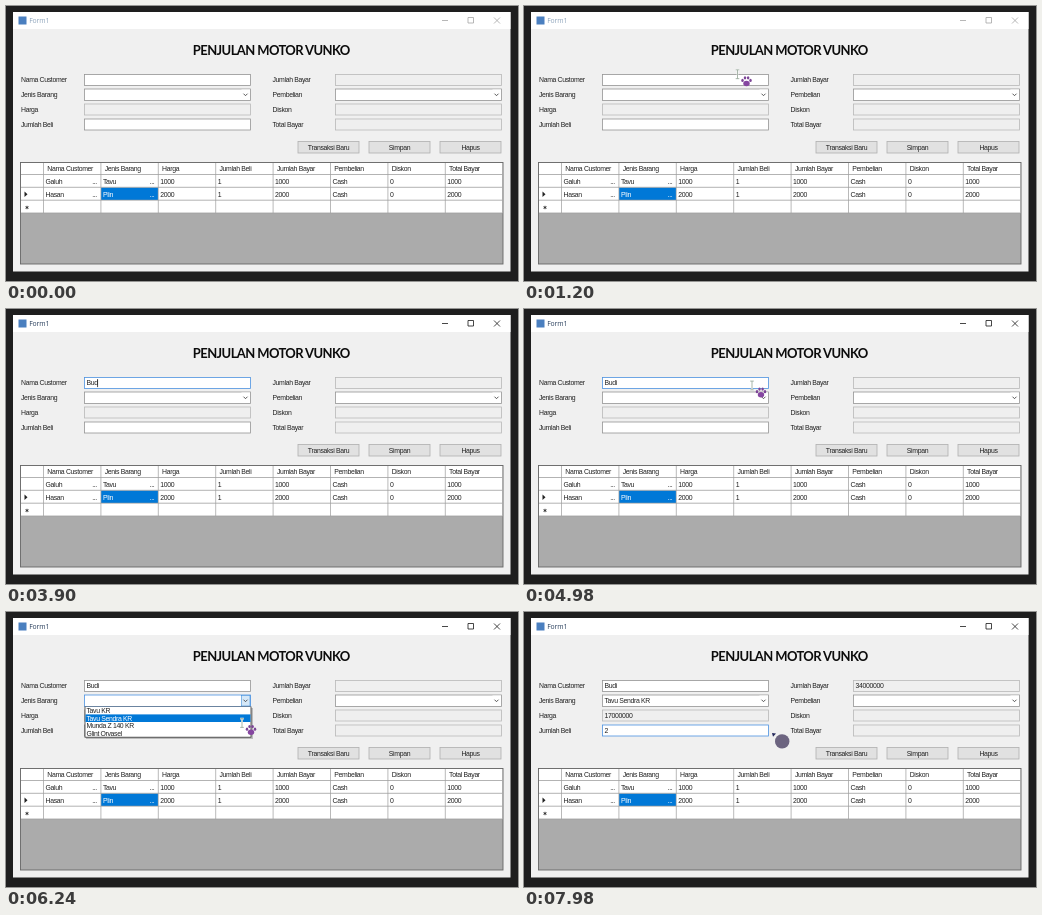
These frames come from a looping animation (512x275 px, 8000 ms). An HTML page:

```html
<!DOCTYPE html>
<html lang="id">
<head>
<meta charset="utf-8">
<title>Form1</title>
<style>
  html, body { margin: 0; width: 100%; height: 100%; overflow: hidden; background: #1e1e1e; }
  svg { display: block; width: 100vw; height: 100vh; }
  text { font: 6.9px "Liberation Sans", Arial, sans-serif; letter-spacing: -.34px; fill: #222; white-space: pre; }
  .caption { font: 6.8px "Open Sans", sans-serif; letter-spacing: -.1px; }
  .heading { font: 700 13px Lato, sans-serif; letter-spacing: -.6px; fill: #0c0c0c; text-anchor: middle; }
  .mid { text-anchor: middle; }
</style>
</head>
<body>
<svg id="stage" viewBox="0 0 512 275"></svg>
<script>
const LOOP = 8000, STEP = 60;
const BLUE = '#0078d7', FOCUS = '#3c8edc', INK = '#222';
const stage = document.getElementById('stage');

function add(tag, attrs, parent = stage) {
  const el = document.createElementNS('http://www.w3.org/2000/svg', tag);
  return parent.appendChild(set(el, attrs));
}
function set(el, attrs) {
  for (const k in attrs) el.setAttribute(k, attrs[k]);
  return el;
}
const group = (parent = stage) => add('g', {}, parent);
const rect = (x, y, width, height, fill, more = {}, parent) =>
  add('rect', { x, y, width, height, fill, ...more }, parent);
const path = (d, stroke, more = {}, parent) =>
  add('path', { d, stroke, fill: 'none', 'stroke-width': .8, ...more }, parent);
function text(x, y, str, more = {}, parent) {
  const el = add('text', { x, y, ...more }, parent);
  el.textContent = str;
  return el;
}
const show = (el, on) => el.setAttribute('visibility', on ? 'visible' : 'hidden');
const clamp = v => Math.max(0, Math.min(1, v));
const mix = (a, b, k) => `rgb(${a.map((v, i) => Math.round(v + (b[i] - v) * k))})`;

// Window frame
rect(0, 0, 512, 275, '#1e1e1e');
rect(7, 6, 497.5, 259.5, '#f0f0f0');
rect(7, 6, 497.5, 17, '#fff');
rect(12.5, 10.5, 8, 8, '#4a7fbf');
const caption = text(23.2, 17.2, 'Form1', { class: 'caption' });
const controls = path('M436 14.5h6M462 11.5h5.5v5.5h-5.5zM488 11.5l6 6m0-6l-6 6', '#000');
text(265.3, 49.2, 'PENJULAN MOTOR VUNKO', { class: 'heading' });

// Form fields
const rowY = [68.5, 83, 98, 113];
function field(x, row, label, labelX, kind) {
  const y = rowY[row], h = kind === 'combo' ? 11.5 : 11;
  text(labelX, y + 7.9, label);
  const box = rect(x, y, 166, h, kind === 'off' ? '#efefef' : '#fff',
    { stroke: kind === 'off' ? '#b8b8b8' : '#949494', 'stroke-width': .8 });
  const button = kind === 'combo' && rect(x + 157, y + .5, 8.5, h - 1, '#fff', { 'stroke-width': .6 });
  if (button) path(`M${x + 159} ${y + 4.7}l2 2l2-2`, '#444', { 'stroke-width': .9 });
  const mark = rect(x + 1.5, y + 1.5, 47.5, 8.5, BLUE, { visibility: 'hidden' });
  return { box, button, mark, value: text(x + 2, y + 7.8, '') };
}
const name = field(78.5, 0, 'Nama Customer', 15, 'edit');
const item = field(78.5, 1, 'Jenis Barang', 15, 'combo');
const price = field(78.5, 2, 'Harga', 15, 'off');
const count = field(78.5, 3, 'Jumlah Beli', 15, 'edit');
const total = field(329.5, 0, 'Jumlah Bayar', 266.5, 'off');
field(329.5, 1, 'Pembelian', 266.5, 'combo');
field(329.5, 2, 'Diskon', 266.5, 'off');
field(329.5, 3, 'Total Bayar', 266.5, 'off');
const caret = rect(80, 70, .8, 8, '#222');

['Transaksi Baru', 'Simpan', 'Hapus'].forEach((label, i) => {
  const x = 292 + i * 71;
  rect(x, 135.5, 61, 11.5, '#e1e1e1', { stroke: '#b0b0b0', 'stroke-width': .8 });
  text(x + 30.5, 143.8, label, { class: 'mid' });
});

// Data grid
const colX = i => 37.5 + i * 57.4;
rect(14.5, 156.5, 482.5, 101.5, '#ababab', { stroke: '#666', 'stroke-width': .9 });
rect(15, 157, 481.5, 50, '#fff');
rect(95, 181.5, 57, 12.5, BLUE);
const heads = ['Nama Customer', 'Jenis Barang', 'Harga', 'Jumlah Beli', 'Jumlah Bayar', 'Pembelian', 'Diskon', 'Total Bayar'];
const rows = [
  ['Galuh', 'Tavu', '1000', '1', '1000', 'Cash', '0', '1000'],
  ['Hasan', 'Plin', '2000', '1', '2000', 'Cash', '0', '2000']
];
heads.forEach((h, i) => {
  text(colX(i) + 3.8, 165.2, h);
  path(`M${colX(i)} 157V207`, '#a8a8a8');
});
rows.forEach((row, r) => row.forEach((v, i) => {
  const more = r === 1 && i === 1 ? { style: 'fill:#fff' } : {};
  const y = 178.2 + r * 12.8;
  text(colX(i) + 2, y, v, more);
  if (i < 2) text(colX(i) + 48.7, y, '...', more);
}));
path('M15 168.5H496.5M15 181.3H496.5M15 194.2H496.5M15 207H496.5M496.6 157V207', '#a0a0a0');
path('M18.5 185.5l3 2.7l-3 2.7z', 'none', { fill: INK });
path('M21 199.8v3.4M19.5 200.6l3 1.8m0-1.8l-3 1.8', INK);

// Drop-down list, sliding out from under the combo box
const clip = add('clipPath', { id: 'below' }, add('defs', {}));
rect(70, 94.5, 190, 40, '#000', {}, clip);
const listClip = add('g', { 'clip-path': 'url(#below)' });
const list = group(listClip);
rect(80, 96, 167, 31, '#000', { opacity: .22 }, list);
rect(79, 94.5, 166, 30.7, '#fff', { stroke: '#333', 'stroke-width': .8 }, list);
const hover = rect(79.5, 0, 165, 7.6, BLUE, {}, list);
const choices = ['Tavu KR', 'Tavu Sendra KR', 'Munda Z 140 KR', 'Glint Orvasel']
  .map((s, i) => text(80.5, 101.4 + i * 7.5, s, {}, list));

// Pointers
const arrow = group();
path('M0 0L4 .6L1 3.8z', 'none', { fill: '#22265a' }, arrow);
add('circle', { cx: 10.2, cy: 8.4, r: 7.2, fill: '#6c6480' }, arrow);
const beam = group();
path('M-1.8-4.4h3.6M0-4.4v8.8M-1.8 4.4h3.6', '#fff', { 'stroke-width': 1.6 }, beam);
path('M-1.8-4.4h3.6M0-4.4v8.8M-1.8 4.4h3.6', '#93a596', {}, beam);
add('ellipse', { cx: 9, cy: 9.2, rx: 3.2, ry: 2.7, fill: '#8546a0' }, beam);
[[5, 6.2], [7.5, 3.6], [10.6, 3.6], [13, 6.2]].forEach(([cx, cy]) =>
  add('ellipse', { cx, cy, rx: 1.25, ry: 1.6, fill: '#7c4596' }, beam));

// Pointer route: time, x, y
const route = [
  [180, 500, 27], [360, 400, 34], [540, 283, 56], [720, 221, 69], [780, 217, 67], [960, 232, 52],
  [1020, 230, 54], [1260, 208, 73], [1560, 208, 73], [1680, 208, 76],
  [4680, 208, 75], [4920, 222, 74], [5160, 246, 84], [5400, 240, 88],
  [5580, 240, 88], [5820, 239, 97], [6240, 236, 111],
  [6300, 236, 111], [6780, 130, 121], [7740, 130, 121], [7980, 248, 121]
];
function pointAt(t) {
  const i = route.findIndex(p => p[0] > t);
  if (i < 0) return route[route.length - 1].slice(1);
  const a = route[Math.max(0, i - 1)], b = route[i];
  const k = clamp((t - a[0]) / (b[0] - a[0]));
  return [a[1] + (b[1] - a[1]) * k, a[2] + (b[2] - a[2]) * k];
}
const within = (t, ...spans) => spans.some(([a, b]) => t >= a && t < b);

function border(f, k) {
  f.box.setAttribute('stroke', mix([148, 148, 148], [76, 146, 224], k));
}

function draw(now) {
  const t = Math.floor((now % LOOP) / STEP) * STEP;
  const ramp = (start, len) => clamp((t - start) / len);

  const active = ramp(1560, 240);
  caption.style.fill = mix([140, 163, 187], [38, 60, 90], active);
  controls.setAttribute('stroke', mix([165, 165, 165], [25, 25, 25], active));

  border(name, ramp(1560, 180) - ramp(5580, 240));
  border(item, ramp(5460, 120) - ramp(6960, 240));
  border(count, ramp(6960, 180));

  const typed = 'Budi'.slice(0, [3600, 3840, 3900, 4200].filter(s => t >= s).length);
  const chosen = t >= 6300;
  name.value.textContent = typed;
  item.value.textContent = chosen ? 'Tavu Sendra KR' : '';
  price.value.textContent = chosen ? '17000000' : '';
  count.value.textContent = t >= 7440 ? '2' : '';
  total.value.textContent = t >= 7500 ? '34000000' : '';

  const marked = within(t, [6300, 6960]);
  show(item.mark, marked);
  item.value.style.fill = marked ? '#fff' : INK;
  const hot = within(t, [5280, 6420]);
  set(item.button, { fill: hot ? '#d5e8f8' : '#fff', stroke: hot ? FOCUS : 'none' });

  show(caret, within(t, [1560, 2400], [2880, 3420], [3600, 4680], [5460, 5640], [6960, 7800]));
  const row = t < 5460 ? 0 : t < 6300 ? 1 : 3;
  const lead = row === 0 ? name.value.getComputedTextLength() : t >= 7440 ? 3.6 : 0;
  set(caret, { x: 80 + lead, y: rowY[row] + 1.6 });

  show(listClip, within(t, [5520, 6300]));
  list.setAttribute('transform', `translate(0 ${t < 5580 ? -18 : t < 5640 ? -4 : 0})`);
  const pick = t < 5820 ? -1 : t < 6000 ? 0 : 1;
  hover.setAttribute('y', 94.9 + pick * 7.5);
  hover.setAttribute('opacity', pick < 0 ? 0 : 1);
  choices.forEach((c, i) => c.style.fill = i === pick ? '#fff' : INK);

  const [x, y] = pointAt(t);
  const shown = within(t, [180, 3600], [4680, 7440], [7800, LOOP]);
  const isBeam = within(t, [1140, 5160], [5880, 7920]);
  show(arrow, shown && !isBeam);
  show(beam, shown && isBeam);
  set(isBeam ? beam : arrow, { transform: `translate(${x} ${y})` });
}

const start = performance.now();
function tick() {
  draw(performance.now() - start);
  requestAnimationFrame(tick);
}
tick();
</script>
</body>
</html>
```
